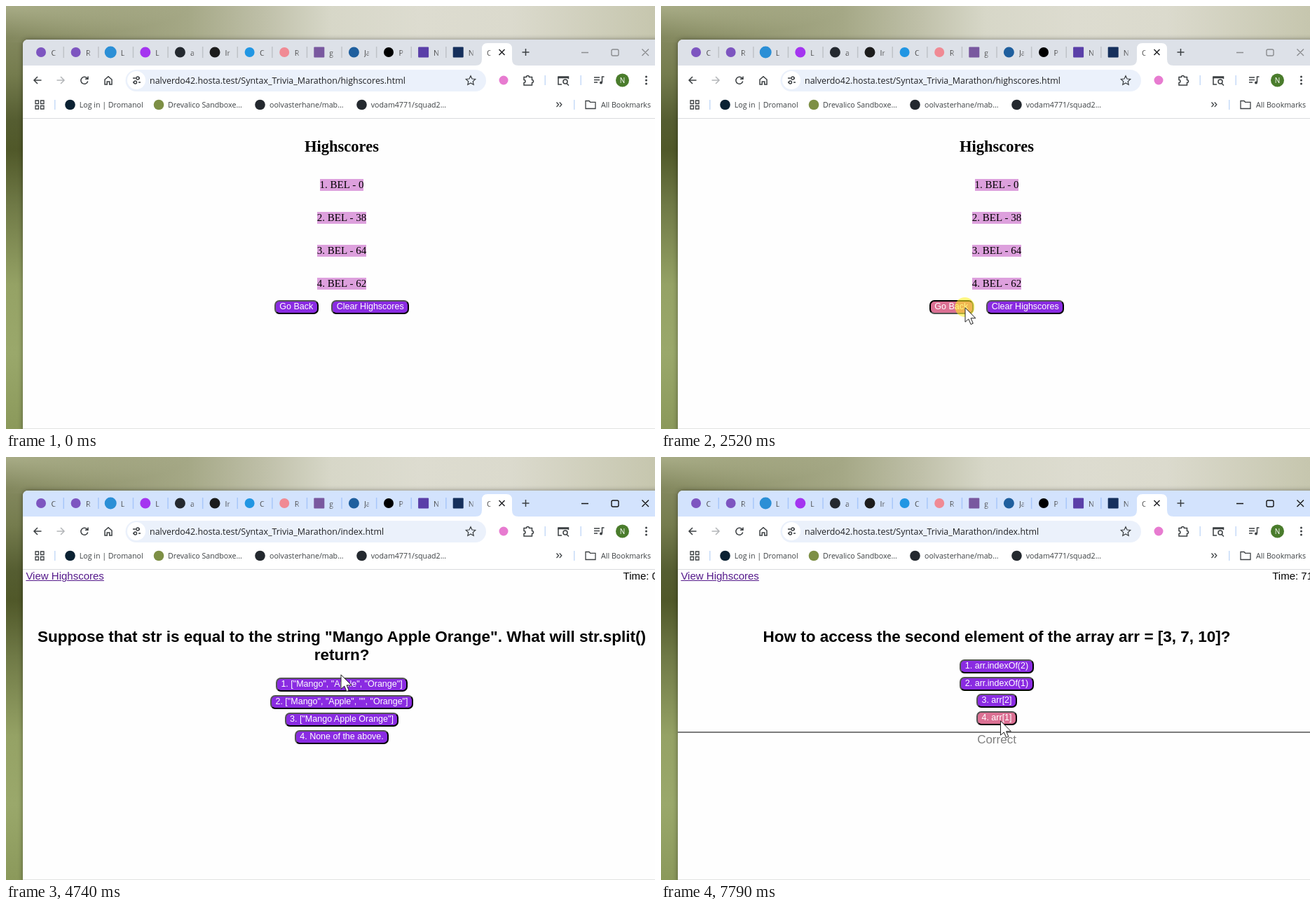
An HTML page for the animation above (8000 ms loop, 926 by 604 pixels).

```html
<!DOCTYPE html>
<html lang="en">
<head>
<meta charset="utf-8">
<title>Quiz</title>
<style>
  html, body { margin: 0; width: 926px; height: 604px; overflow: hidden; }
  body {
    position: relative;
    background:
      radial-gradient(ellipse 260px 46px at 0 0, rgba(205,208,175,.5), transparent) no-repeat,
      linear-gradient(90deg, #82875d 0, #92966f 12%, #a5a886 28%, #bdbea6 39%, #d7d7c8 50%, #dddcd0 64%, #dbdacd 78%, #c6c6ae 100%) 0 0 / 100% 52px no-repeat,
      linear-gradient(#82875d 8%, #757c4e 16%, #555d31 27%, #505829 34%, #6f7946 47%, #95a265 66%, #9aa86b 82%, #8b995b);
  }
  #win {
    position: absolute; left: 24px; top: 48px; width: 920px; height: 560px;
    border-radius: 7px 0 0 0; background: #fefefe; box-shadow: 0 0 7px rgba(0,0,0,.4);
  }
  #chrome, #pointer { position: absolute; left: 0; top: 0; width: 926px; height: 604px; }
  #chrome {
    --strip: #dde1e8; --rule: #bfc3c8; --ctl: #8b8d90;
    font: 10.65px "Open Sans", "Noto Sans", sans-serif;
  }
  #chrome.focus { --strip: #d3e3fd; --rule: #a8c7fa; --ctl: #151515; }
  .line { fill: none; stroke: #3c4043; stroke-width: 1.5; }
  .ctl { fill: none; stroke: var(--ctl); stroke-width: 1.4; }
  .scene { position: absolute; inset: 0; visibility: hidden; font: 15px "Liberation Sans", Arial, sans-serif; color: #000; }
  .scene.on { visibility: visible; }
  .row { position: absolute; left: 24px; width: 910px; text-align: center; white-space: nowrap; }
  .head { font-size: 22.5px; line-height: 26px; font-weight: bold; }
  .serif { font-family: "Liberation Serif", "Times New Roman", serif; }
  .score { line-height: 17px; }
  .score span { display: inline-block; background: #dda0dd; }
  .btn {
    display: inline-block; box-sizing: border-box; height: 20px; padding: 0 5.5px;
    border: 2px outset #000; border-radius: 7px; background: #8a2be2; color: #fff;
    font-size: 12.5px; line-height: 15.4px; vertical-align: top;
  }
  .btn + .btn { margin-left: 18.5px; }
  .btn.hover { background: #db7093; }
  .btn.press { border-style: inset; }
  .link { position: absolute; left: 28.4px; top: 161px; line-height: 17px; color: #551a8b; text-decoration: underline; }
  .time { position: absolute; right: -4px; top: 161px; line-height: 17px; }
  hr { position: absolute; left: 24px; right: 0; top: 392px; height: 2px; margin: 0; border: 0; background: #7c7c7c; }
  .verdict { top: 393.5px; font-size: 17px; line-height: 20px; color: #808080; }
</style>
</head>
<body>
<div id="win"></div>
<svg id="chrome"></svg>
<div id="page"></div>
<svg id="pointer">
  <circle id="halo" r="14" fill="#fff01c"/>
  <path id="arrow" d="M.5 .8V21.2L5.300 17 8.600 24.600 11.800 23.200 8.600 15.800H15.400Z" fill="#fff" stroke="#222"/>
</svg>
<script>
const LOOP = 8000;
const $ = id => document.getElementById(id);
const SITE = 'nalverdo42.hosta.test/Syntax_Trivia_Marathon/';

// ---- browser frame ----
const dot = (x, y, r, c) => `<circle cx="${x}" cy="${y}" r="${r}" fill="${c}"/>`;
const box = (x, y, w, h, c, r = 0) => `<rect x="${x}" y="${y}" width="${w}" height="${h}" rx="${r}" fill="${c}"/>`;
const line = (d, cls = 'line', more = '') => `<path class="${cls}" d="${d}" ${more}/>`;
const label = (x, y, s, c = '#3c4043', more = '') => `<text x="${x}" y="${y}" fill="${c}" ${more}>${s}</text>`;
// tab titles are cut off after a few pixels
const tabTitle = (x, s, w) => `<svg x="${x}" y="58" width="${w}" height="18">${label(0, 12.5, s, 'url(#fade)')}</svg>`;

const tabs = [
  ['C', '#7d55c0'], ['R', '#7d55c0'], ['L', '#2b8fd6', 8.5], ['L', '#a435f0', 7.5], ['a', '#24292f', 7.5],
  ['Ir', '#1c1c1c', 7.5], ['C', '#2196e3'], ['R', '#f08a94'], ['g', '#79589f', 0], ['Ja', '#1f5f9e', 7.5],
  ['P', '#000'], ['N', '#5a3fa8', 0], ['N', '#16305c', 0]
];

function tabStrip() {
  let s = '<path fill="var(--strip)" d="M24 85V55a7 7 0 0 1 7-7H926V85Z"/>';
  tabs.forEach(([name, color, r = 7], i) => {
    const x = 50 + i * 49.6;
    s += r ? dot(x, 66, r, color) : box(x - 7.5, 58.5, 15, 15, color, 1);
    s += tabTitle(x + 14.5, name, 7);
    if (i < 12) s += box(x + 31.5, 58, 1.5, 16, 'var(--rule)');
  });
  s += '<path fill="#fff" d="M670 85q9 0 9-9V61q0-8 8-8h27q8 0 8 8v15q0 9 9 9Z"/>';
  s += tabTitle(686, 'C', 5.5);
  s += line('M703.5 62l8 8m0-8l-8 8', 'line', 'style="stroke:#202124"');
  s += line('M736.5 66h10m-5-5v10');
  s += line('M821 66.5h10M866 62h6q2 0 2 2v5q0 2-2 2h-6q-2 0-2-2v-5q0-2 2-2ZM907.5 61.5l9.5 9.5m0-9.5l-9.5 9.5', 'ctl');
  return s;
}

function toolbar() {
  let s = box(24, 85, 902, 75, '#fff') + box(24, 160, 902, 1, '#d9dbde');
  s += box(170.5, 91, 514.5, 31, '#ebf1fb', 15.5) + dot(186, 106, 13, '#fff');
  s += line('M50.5 106H40m5-5l-5 5 5 5');
  s += line('M72.5 106H83m-5-5l5 5-5 5', 'line', 'style="stroke:#b4b6b9"');
  s += line('M116 103.5a5 5 0 1 0 .7 4M117 100.5v3.8h-4');
  s += line('M141 105l5-4.3 5 4.3v7h-3.2v-4h-3.6v4H141Z');
  s += line('M181 103h4m4 6h3M181 109h2m6-6h2');
  s += '<g class="line"><circle cx="188" cy="103" r="2"/><circle cx="184.5" cy="109" r="2"/></g>';
  s += '<text id="url" x="205" y="110.6" font-size="12.45" fill="#202124"></text>';
  s += line('M663 99.7l2 4.3 4.7.5-3.5 3.2 1 4.6-4.2-2.4-4.2 2.4 1-4.6-3.5-3.2 4.7-.5Z', 'line', 'style="stroke-width:1.2"');
  s += dot(710, 106, 6.5, '#e77bd0');
  s += line('M739 101.5h3.5a2 2 0 0 1 4 0h4v4a2 2 0 0 1 0 4v3.5H739v-3.5a2 2 0 0 0 0-4Z');
  s += box(768.5, 99, 1.5, 14, '#c7dbf8') + box(819.5, 99, 1.5, 14, '#c7dbf8');
  s += line('M793 112h-5v-11h14.5v3M787 102.5h16');
  s += '<circle class="line" cx="798" cy="108" r="3"/>' + line('M800 110.5l3 3');
  s += line('M839 102h8m-8 3.5h8m-8 3.5h5M850.5 109v-8h3');
  s += dot(849, 109.5, 2, '#3c4043');
  s += dot(879.5, 106, 9.5, '#4a7c2c') + label(879.5, 109.6, 'N', '#fff', 'text-anchor="middle" font-size="10"');
  for (const y of [101, 106, 111]) s += dot(913.5, y, 1.5, '#3c4043');
  return s;
}

function bookmarks() {
  let s = '';
  for (const x of [42, 49.5]) for (const y of [135, 142.5])
    s += line(`M${x} ${y}h4.5v4.5h-4.5Z`, 'line', 'style="stroke-width:1.3"');
  s += box(69, 134, 1.5, 14, '#c7dbf8') + box(810, 134, 1.5, 14, '#c7dbf8');
  const marks = [
    [91.5, '#0b2233', 104.7, 'Log in | Dromanol'],
    [218, '#7d8f45', 231, 'Drevalico Sandboxe...'],
    [362.5, '#24292f', 376, 'oolvasterhane/mab...'],
    [507.5, '#24292f', 520.7, 'vodam4771/squad2...']
  ];
  for (const [x, color, tx, name] of marks) s += dot(x, 141, 7.3, color) + label(tx, 144.7, name);
  s += line('M785.5 137.5l3 3.3-3 3.3m4.3-6.6l3 3.3-3 3.3', 'line', 'style="stroke-width:1.3"');
  s += line('M827 146.5v-11h5l1.6 1.8h7.4v9.2Z', 'line', 'style="stroke-width:1.3"');
  return s + label(849, 144.7, 'All Bookmarks');
}

$('chrome').innerHTML =
  `<defs><linearGradient id="fade"><stop offset=".3" stop-color="#444"/>
   <stop offset="1" stop-color="#444" stop-opacity=".45"/></linearGradient></defs>` +
  tabStrip() + toolbar() + bookmarks() + box(24, 603, 902, 1, '#e2e3e1');

// ---- pages ----
const row = (y, cls, html) => `<div class="row ${cls}" style="top:${y}px">${html}</div>`;
const btn = s => `<span class="btn">${s}</span>`;
const answers = (y, list) => list.map((s, i) => row(y + i * 24.7, '', btn(`${i + 1}. ${s}`))).join('');
const topBar = '<span class="link">View Highscores</span><span class="time"></span>';

const scenes = [
  { at: 0, url: 'highscores.html', html:
      row(187.5, 'head serif', 'Highscores') +
      [0, 38, 64, 62].map((n, i) => row(247 + i * 47, 'serif score', `<span>${i + 1}. BEL - ${n}</span>`)).join('') +
      row(420, '', btn('Go Back') + btn('Clear Highscores')) },
  { at: 2650, url: 'index.html', html:
      topBar + row(244, 'head', 'Syntax Trivia Marathon') + row(289, '', btn('Start Quiz')) },
  { at: 3880, url: 'index.html', html:
      topBar +
      row(244, 'head', 'Suppose that str is equal to the string "Mango Apple Orange". What will str.split()<br>return?') +
      answers(315.4, ['["Mango", "Apple", "Orange"]', '["Mango", "Apple", "", "Orange"]', '["Mango Apple Orange"]', 'None of the above.']) },
  { at: 5740, url: 'index.html', html:
      topBar + row(244, 'head', 'How to access the second element of the array arr = [3, 7, 10]?') +
      answers(289, ['arr.indexOf(2)', 'arr.indexOf(1)', 'arr[2]', 'arr[1]']) +
      '<hr><div class="row verdict">Correct</div>' }
];

for (const sc of scenes) {
  sc.el = document.createElement('div');
  sc.el.className = 'scene';
  sc.el.innerHTML = sc.html;
  $('page').append(sc.el);
  sc.time = sc.el.querySelector('.time');
  sc.buttons = [...sc.el.querySelectorAll('.btn')].map(el => ({ el, r: el.getBoundingClientRect() }));
}

// ---- pointer: start, end, steps, x, y, bend ----
const moves = [
  [250, 580, 6, 836, 546],
  [930, 1240, 6, 743.5, 430],
  [1450, 2250, 12, 441, 431, -13],
  [2320, 2380, 2, 433.5, 430],
  [2990, 3750, 12, 476, 301],
  [4340, 4340, 1, 476, 302],
  [4740, 4940, 4, 483, 340],
  [5080, 5410, 6, 485, 378],
  [6040, 6070, 2, 484, 380],
  [6340, 6530, 4, 480, 391],
  [6730, 6990, 4, 484, 385],
  [7130, 7320, 4, 484, 376]
];
// down, up, faded, x, y
const clicks = [
  [2520, 2590, 2720, 433.5, 430],
  [3750, 3880, 3880, 476, 301],
  [5610, 5740, 5810, 485, 379]
];

function pointerAt(t) {
  let x = 860, y = 606;
  for (const [a, b, n, tx, ty, bend = 0] of moves) {
    if (t < a) break;
    const gap = n > 1 ? (b - a) / (n - 1) : 1;
    const p = Math.min(n, Math.floor((t - a) / gap + 1e-6) + 1) / n;
    const e = p * .6 + p * p * (3 - 2 * p) * .4;
    x += (tx - x) * e;
    y += (ty - y) * e + bend * Math.sin(Math.PI * p);
    if (p < 1) break;
  }
  return [x, y];
}

const secondsLeft = t => t < 4790 ? 0 : 74 - Math.floor((t - 4790) / 1000);

function draw(t) {
  const scene = scenes.filter(s => t >= s.at).pop();
  const [x, y] = pointerAt(t);
  const click = clicks.find(c => t >= c[0] && t < c[2]);
  const down = !!click && t < click[1];

  $('chrome').classList.toggle('focus', t >= 2590);
  $('url').textContent = SITE + scene.url;
  for (const s of scenes) s.el.classList.toggle('on', s === scene);
  if (scene.time) scene.time.textContent = 'Time: ' + secondsLeft(t);

  for (const { el, r } of scene.buttons) {
    const over = x >= r.left && x <= r.right && y >= r.top && y <= r.bottom;
    el.classList.toggle('hover', over);
    el.classList.toggle('press', over && down);
  }

  $('arrow').setAttribute('transform', `translate(${x} ${y})`);
  const halo = $('halo');
  halo.setAttribute('opacity', !click ? 0 : down ? .55 : .55 * (click[2] - t) / (click[2] - click[1]));
  if (click) {
    halo.setAttribute('cx', click[3]);
    halo.setAttribute('cy', click[4]);
  }
}

const start = performance.now();
function tick() {
  draw((performance.now() - start) % LOOP);
  requestAnimationFrame(tick);
}
tick();
</script>
</body>
</html>
```
